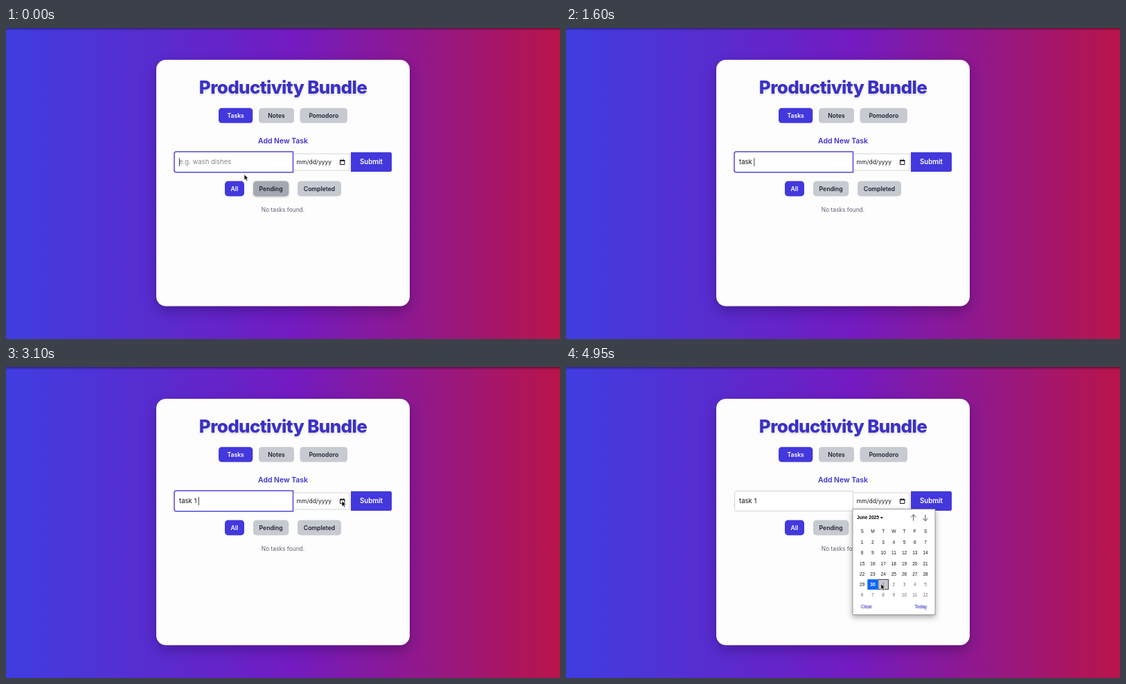
Animation of 800 by 450 pixels, one loop 5000 ms. Source, as an HTML page:

```html
<!DOCTYPE html>
<html lang="en">
<head>
<meta charset="utf-8">
<title>Productivity Bundle</title>
<style>
  html, body { margin: 0; width: 100%; height: 100%; overflow: hidden; }
  svg { display: block; width: 100vw; height: 100vh; font-family: Inter, sans-serif; }
  text { white-space: pre; }
  .mid { text-anchor: middle; }
  .bold { font-weight: 600; }
  #picker text { font-family: "Liberation Sans", Arial, sans-serif; font-size: 6.6px; }
  #title { filter: drop-shadow(0 2px 1.5px rgba(0, 0, 0, .16)); }
  #card { filter: drop-shadow(0 7px 9px rgba(10, 0, 50, .3)); }
  #popup { filter: drop-shadow(0 3px 4px rgba(0, 0, 0, .35)); }
  .link { fill: #4a40d8; filter: drop-shadow(0 1.5px 1px rgba(40, 40, 120, .4)); }
</style>
</head>
<body>
<svg id="stage" viewBox="0 0 800 450" preserveAspectRatio="none">
  <defs>
    <linearGradient id="bg">
      <stop offset="0" stop-color="#403de0"/>
      <stop offset=".25" stop-color="#572dd0"/>
      <stop offset=".52" stop-color="#731bc0"/>
      <stop offset=".76" stop-color="#931888"/>
      <stop offset="1" stop-color="#b9144a"/>
    </linearGradient>
    <linearGradient id="edge" x2="0" y2="1">
      <stop offset="0" stop-opacity=".38"/>
      <stop offset="1" stop-opacity="0"/>
    </linearGradient>
  </defs>
  <rect width="800" height="450" fill="url(#bg)"/>
  <rect width="800" height="4" fill="url(#edge)"/>
  <rect id="card" x="217" y="46" width="366" height="356.5" rx="14" fill="#fdfdfd"/>
  <text id="title" class="mid" x="400" y="95.3" font-size="26" font-weight="800" letter-spacing="-.65" fill="#3b30c6">Productivity Bundle</text>
  <g id="buttons"></g>
  <text class="mid bold" x="400" y="166.8" font-size="10.4" fill="#3d31cc">Add New Task</text>

  <rect x="414.5" y="182" width="81.5" height="24" fill="#fff" stroke="#d3d6de"/>
  <text x="419.5" y="197.2" font-size="8.5" fill="#16181d">mm/dd/yyyy</text>
  <path d="M482.5 191.5h6.4v6h-6.4zM484 190v1.5M487.4 190v1.5" fill="none" stroke="#111"/>
  <path d="M482 192h7.4" stroke="#111" stroke-width="1.4"/>
  <path id="field" fill="#fff"/>
  <text id="entry" x="250" y="197.3" font-size="9.5"></text>
  <path id="caret" d="M.4 188v12" stroke="#111" stroke-width=".8"/>
  <path d="M498 179.8h56.5q2.5 0 2.5 2.5v23.2q0 2.5-2.5 2.5H498z" fill="#4338dc"/>
  <text class="mid bold" x="527.5" y="197.3" font-size="9.7" fill="#fff">Submit</text>
  <text class="mid" x="400" y="266.2" font-size="8.4" fill="#5b6070">No tasks found.</text>

  <g id="picker">
    <rect id="popup" x="414" y="205.7" width="119" height="152.8" fill="#fff" stroke="#85858c" stroke-width=".8"/>
    <text x="420" y="220.3" font-weight="700">June 2025</text>
    <path d="M453.6 217h4.2l-2.1 2.4z"/>
    <path d="M501.7 222.6v-8.8m-3.6 3.6l3.6-3.6 3.6 3.6M518.9 213.8v8.8m-3.6-3.6l3.6 3.6 3.6-3.6" fill="none" stroke="#333" stroke-width=".9"/>
    <rect id="hover" width="14.6" height="14.6" fill="#c5c8d0" stroke="#222" stroke-width=".8"/>
    <rect id="today" x="435.3" y="307.2" width="15.2" height="15" fill="#0b66f5"/>
    <rect id="ring" x="435.8" y="307.7" width="14.2" height="14" fill="none" stroke="#5d6785" stroke-width="1"/>
    <g id="days"></g>
    <text class="link" x="426" y="349">Clear</text>
    <text class="link" x="503.5" y="349">Today</text>
  </g>
  <path id="cursor" d="M0 0v8.3l1.9-1.7 1.4 3 1.5-.7-1.4-2.9h2.6z" fill="#000" stroke="#fff" stroke-width=".7" stroke-linejoin="round"/>
</svg>
<script>
const LOOP = 5000, STEP = 50;
const OPEN = 3150;
const CELL = 15.23, COL0 = 427.7, ROW0 = 253.7;
const $ = id => document.getElementById(id);

function add(parent, tag, attrs, text = '') {
  const el = document.createElementNS('http://www.w3.org/2000/svg', tag);
  for (const key in attrs) el.setAttribute(key, attrs[key]);
  el.textContent = text;
  parent.append(el);
  return el;
}

function button(label, x, y, w, active) {
  const box = add($('buttons'), 'rect', {
    x, y, width: w, height: 21.8, rx: 4.5, fill: active ? '#4338dc' : '#c7cad1'
  });
  add($('buttons'), 'text', {
    class: 'mid bold', x: x + w / 2, y: y + 14, 'font-size': 8.6, fill: active ? '#fff' : '#1c2230'
  }, label);
  return box;
}

button('Tasks', 307, 115.8, 49.3, true);
button('Notes', 365, 115.8, 51, false);
button('Pomodoro', 424.5, 115.8, 68.5, false);
button('All', 316, 221.6, 28, true);
const pending = button('Pending', 357, 221.6, 51.3, false);
button('Completed', 421, 221.6, 63, false);

function dayText(col, y, text, fill, weight = 400) {
  add($('days'), 'text', {
    class: 'mid', x: COL0 + col * CELL, y: y + 2.4, fill, 'font-weight': weight
  }, text);
}
[...'SMTWTFS'].forEach((d, i) => dayText(i, 238, d, '#111'));
for (let i = 0; i < 42; i++) {
  const inMonth = i < 30, isToday = i === 29;
  const fill = isToday ? '#fff' : inMonth ? '#111' : '#6c6c72';
  dayText(i % 7, ROW0 + Math.floor(i / 7) * CELL, inMonth ? i + 1 : i - 29, fill, isToday ? 700 : 400);
}

// [time, typed text]
const typing = [[800, 't'], [950, 'ta'], [1100, 'tas'], [1250, 'task'], [1400, 'task '], [1700, 'task 1'], [1900, 'task 1 ']];
// [time, x, y] of the pointer tip
const path = [
  [0, 344, 211.8], [2300, 344, 211.8], [2700, 467.8, 190.2], [2900, 485, 193.5], [3200, 485, 193.5],
  [3450, 478.8, 229], [3600, 478.8, 229], [4100, 447, 314], [4400, 447, 314], [4650, 454.8, 313.7], [5000, 454.8, 313.7]
];

function pointer(t) {
  const i = path.findIndex(p => p[0] > t);
  const [t0, x0, y0] = path[i - 1], [t1, x1, y1] = path[i];
  const u = (t - t0) / (t1 - t0), e = u * u * (3 - 2 * u);
  return [x0 + (x1 - x0) * e, y0 + (y1 - y0) * e];
}

const show = (id, on) => $(id).setAttribute('visibility', on ? 'inherit' : 'hidden');

function drawField(focused) {
  const [x, y, r, b] = focused ? [243, 179, 414.5, 208.7] : [243.5, 179.5, 414.5, 208.3];
  const field = $('field');
  field.setAttribute('d', `M${r} ${y}V${b}H${x + 3}q-3 0-3-3V${y + 3}q0-3 3-3z`);
  field.setAttribute('stroke', focused ? '#5048d4' : '#cfd2da');
  field.setAttribute('stroke-width', focused ? 1.5 : 1);
}

function drawEntry(t, focused) {
  const key = typing.filter(k => k[0] <= t).pop();
  const entry = $('entry');
  entry.textContent = key ? key[1] : 'e.g. wash dishes';
  entry.setAttribute('fill', key ? '#111' : '#85868c');
  const x = 250 + (key ? entry.getComputedTextLength() : 0);
  $('caret').setAttribute('transform', `translate(${x})`);
  const since = t - (key ? key[0] : 0);
  show('caret', focused && since % 1000 < 500);
}

function drawPicker(t, x, y) {
  const open = t >= OPEN;
  show('picker', open);
  const col = Math.round((x - COL0) / CELL), row = Math.round((y - ROW0) / CELL);
  const inside = open && col >= 0 && col < 7 && row >= 0 && row < 6;
  const onToday = col === 1 && row === 4;
  show('hover', inside && !onToday);
  show('ring', open && !inside);
  $('hover').setAttribute('x', COL0 + col * CELL - 7.3);
  $('hover').setAttribute('y', ROW0 + row * CELL - 7.3);
}

function draw(t) {
  const focused = t < OPEN;
  const [x, y] = pointer(t);
  drawField(focused);
  drawEntry(t, focused);
  drawPicker(t, x, y);

  const k = Math.max(0, Math.min(1, 1 - (t - 50) / 200));
  const mix = (a, b) => Math.round(a + (b - a) * k);
  pending.setAttribute('fill', `rgb(${mix(199, 165)},${mix(202, 167)},${mix(209, 177)})`);
  pending.style.filter = k ? `drop-shadow(0 1.5px 1.5px rgba(0,0,0,${0.22 * k}))` : 'none';

  $('cursor').setAttribute('transform', `translate(${x} ${y})`);
  show('cursor', t < 800 || t >= 2300);
}

function tick() {
  const t = performance.now() % LOOP;
  draw(t - t % STEP);
  requestAnimationFrame(tick);
}
tick();
</script>
</body>
</html>
```
